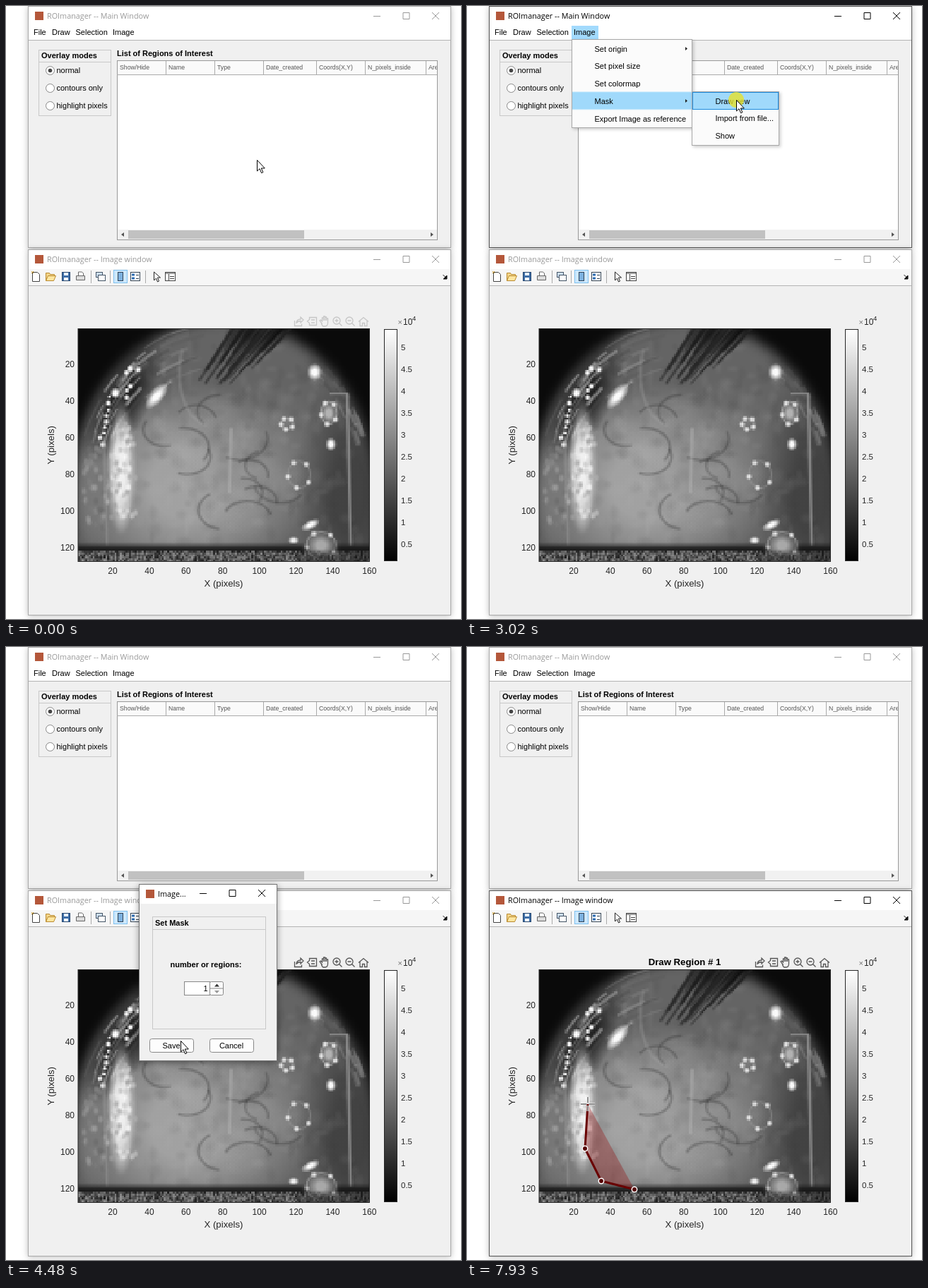
Animation of 644 by 869 pixels, one loop 8 s. Source, as an HTML page with a canvas:

```html
<!DOCTYPE html>
<html lang="en">
<head>
<meta charset="utf-8">
<title>ROImanager</title>
<style>
  html, body { margin: 0; width: 100%; height: 100%; overflow: hidden; background: #fff; }
  svg { position: absolute; left: 0; top: 0; font: 11px "Liberation Sans", Arial, sans-serif; }
  canvas { position: absolute; left: 102px; top: 457px; width: 413px; height: 331px; image-rendering: pixelated; }
  .title { font: 10.8px "Open Sans", "Noto Sans", sans-serif; }
  .b { font-weight: bold; }
  .mid { text-anchor: middle; }
  .end { text-anchor: end; }
  .line { fill: none; stroke: currentColor; }
  .hidden { opacity: 0; }
</style>
</head>
<body>
<svg id="back" width="644" height="869"></svg>
<canvas id="photo" width="160" height="128"></canvas>
<svg id="front" width="644" height="869"></svg>
<script>
const LOOP = 8000;
const $ = id => document.getElementById(id);

// ---- markup helpers ----
const text = (x, y, s, size = 11, cls = '', fill = '#000') =>
  `<text x="${x}" y="${y}" class="${cls}" fill="${fill}" style="font-size:${size}px">${s}</text>`;
const rect = (x, y, w, h, fill, stroke = 'none', extra = '') =>
  `<rect x="${x}" y="${y}" width="${w}" height="${h}" fill="${fill}" stroke="${stroke}" ${extra}/>`;
const path = (d, stroke = '#555', fill = 'none', extra = '') =>
  `<path d="${d}" stroke="${stroke}" fill="${fill}" ${extra}/>`;
const range = (n, f) => Array.from({ length: n }, (_, i) => f(i)).join('');
const caption = (x, y, s) => `<text x="${x}" y="${y}" class="title" fill="currentColor">${s}</text>`;
const controls = (x, y, gap) =>
  `<path class="line" d="M${x - 5} ${y + .5}h10m${gap - 9.5}-5h9v9h-9zm${gap - .5}-.5l10 10m0-10l-10 10"/>`;
const logo = (x, y) => rect(x, y, 12, 12, '#b4573a');

function frame(id, y, h, name) {
  return rect(31.5, y + .5, 598, h, '#f0f0f0', '#aaa', `id="${id}Box" style="filter:drop-shadow(0 1px 4px #0004)"`) +
    rect(32, y + 1, 597, 27, '#fff') + logo(41, y + 8) +
    `<g id="${id}Bar" color="#999">${caption(58, y + 18, name)}${controls(525, y + 14, 41.5)}</g>`;
}

// ---- main window ----
function mainWindow() {
  const radios = ['normal', 'contours only', 'highlight pixels'];
  const cols = { 'Show/Hide': 69, Name: 69, Type: 69, Date_created: 75, 'Coords(X,Y)': 69, N_pixels_inside: 86, Area: 69 };
  let x = 157.5;
  const head = Object.entries(cols).map(([name, w]) => {
    const cell = text(x + 3.5, 90, name, 8.7, '', '#555') + path(`M${x} 78v19`, '#aaa');
    x += w;
    return cell;
  }).join('');
  return frame('main', 0, 342, 'ROImanager -- Main Window') +
    rect(32, 27, 597, 21, '#fff') + path('M32 48.5h597', '#b4b4b4') +
    rect(148, 28, 38, 20, '#a2dafd', 'none', 'id="menuHead" class="hidden"') +
    text(39, 41, 'File') + text(65, 41, 'Draw') + text(98.5, 41, 'Selection') + text(151, 41, 'Image') +
    rect(46.5, 62.5, 102, 93, '#f0f0f0', '#c8c8c8') + path('M46 79.5h103', '#c8c8c8') +
    text(50, 74, 'Overlay modes', 11, 'b') +
    radios.map((s, i) => `<circle cx="62.5" cy="${91.5 + i * 25}" r="6" fill="#fff" stroke="#888"/>` +
      text(71.5, 95 + i * 25, s)).join('') + '<circle cx="62.5" cy="91.5" r="2.8" fill="#444"/>' +
    text(157, 71, 'List of Regions of Interest', 11, 'b') +
    rect(157.5, 77.5, 453, 254, '#fff', '#999') + rect(158, 78, 452, 19, '#fafafa') + path('M157 97.5h453', '#aaa') +
    `<svg x="158" y="78" width="452" height="20" viewBox="158 78 452 20">${head}</svg>` +
    rect(158, 317, 452, 14, '#f1f1f1') + rect(173, 318, 249, 12, '#c1c1c1') +
    path('M167 321v6l-4-3zM601 321v6l4-3z', 'none', '#555');
}

// ---- image window ----
function toolIcons() {
  return path('M37.5 377.5h7l3 3v10h-10z', '#444', '#fff') + path('M36 376l3 3m0-3l-3 3', '#d09a20') +
    path('M56.5 389.5v-11h5l1 2h6v3', '#b98a30', '#f3d58a') + path('M56.5 389.5l3-7h11l-3 7z', '#b98a30', '#ffe6a0') +
    rect(79.5, 377.5, 11, 12, '#3f6fa8', '#24456e') + rect(82, 378, 6, 4, '#e8f0f8') + rect(82, 385, 6, 4, '#fff') +
    path('M102.5 382v-5h5l2 2v3', '#666', '#fff') + path('M99.5 382.5h12v6h-12z', '#666', '#ddd') +
    path('M120.5 375v18m27-18v18m50-18v18', '#aaa') +
    rect(127.5, 377.5, 9, 7, '#cfe0f2', '#456') + rect(130.5, 381.5, 10, 8, '#fff', '#456') +
    rect(152.5, 374.5, 19, 18, '#cce8ff', '#7fc1ee') + rect(158.5, 377.5, 7, 12, '#7db2e0', '#345') +
    rect(176.5, 377.5, 13, 12, '#fff', '#345') + path('M178 381h4m-4 5h4', '#2c6bb0', 'none', 'stroke-width="3"') + path('M184 381.5h4m-4 5h4', '#345') +
    path('M209.5 377v12l3-3 2 5 2-1-2-5h4z', '#222', '#fff') +
    rect(225.5, 377.5, 14, 12, '#fff', '#444') + path('M226 379h13M230.5 380v9M232 383.5h6m-6 3h6', '#444') +
    path('M618.5 381l4 4M624 382v5h-5z', '#111', '#111');
}

function imageWindow() {
  const ink = '#262626';
  return frame('img', 345, 518, 'ROImanager -- Image window') +
    rect(32, 373, 597, 23, '#f6f6f6') + path('M32 396.5h597', '#b4b4b4') + toolIcons() +
    range(8, i => text(151 + i * 51.9, 805, 20 * (i + 1), 12, 'mid', ink)) +
    range(6, i => text(97, 512.3 + i * 51.85, 20 * (i + 1), 12, 'end', ink)) +
    text(308, 823, 'X (pixels)', 13.2, 'mid', ink) +
    `<g transform="translate(68 622.5) rotate(-90)">${text(0, 0, 'Y (pixels)', 13.2, 'mid', ink)}</g>` +
    `<linearGradient id="gray" x2="0" y2="1"><stop stop-color="#fff"/><stop offset="1" stop-color="#000"/></linearGradient>` +
    rect(535.5, 458.5, 18, 328, 'url(#gray)', ink) +
    range(10, i => text(559, 766.5 - i * 30.95, (i + 1) / 2, 11.5, '', ink)) +
    text(554.5, 452, '×', 11, '', '#777') + text(562, 452, '10', 12, '', ink) + text(575, 446, '4', 9.5, '', ink);
}

// ---- overlays ----
const axesTools = () => `<g id="axesTools" stroke-width="1.3">` +
  path('M408.5 446v7.5h10v-3M411 450q0-6 6-6v-3l4 4-4 4v-2.500q-4 0-6 3z') +
  path('M429.5 441.500h10v11h-10v-3l-3-2.500 3-2.500zM432 445h5m-5 4h5') +
  path('M447 450l-3-4 1.500-1 2 2v-5h2v4-6h2v6-5h2v5-3h2v6q0 5-4 5h-2q-2 0-3-4z') +
  [468, 486].map(x => `<circle cx="${x}" cy="446" r="5" fill="none" stroke="#555"/>` +
    path(`M${x + 3.5} 449.500l4 4M${x - 2.5} 446h5`)).join('') + path('M468 443.500v5') +
  path('M499 447.500l7-6 7 6M501 446v7.500h3.500v-4h3v4h3.500v-7.500') + '</g>';

function dialog() {
  const button = (x, s, id) => rect(x + .5, 555.5, 62, 19, '#fdfdfd', '#888', `rx="3" id="${id}"`) + text(x + 31, 568.5, s, 11, 'mid');
  return `<g id="dialog" class="hidden" style="transform-origin:286px 461px">` +
    rect(188.5, 336.5, 195, 250, '#f0f0f0', '#777', 'style="filter:drop-shadow(0 2px 5px #0006)"') +
    rect(189, 337, 194, 27, '#fff') + logo(198, 344) + controls(279, 349, 41.5) +
    `<g id="dialogBody">` + caption(215, 354, 'Image...') +
    rect(207.5, 382.5, 160, 159, '#f0f0f0', '#c8c8c8') + path('M207 400.5h161', '#c8c8c8') +
    text(211, 395, 'Set Mask', 11, 'b') + text(283, 453.5, 'number or regions:', 11, 'b mid') +
    rect(252.5, 474.5, 36, 19, '#fff', '#888') + text(285.5, 488, '1', 11, 'end') +
    rect(288.5, 474.5, 19, 19, '#fafafa', '#888', 'rx="2"') + path('M289 484h19', '#888') +
    path('M295 481.500h7l-3.500-4z', 'none', '#333') + path('M295 487h7l-3.500 4z', 'none', '#999') +
    button(203, 'Save', 'save') + button(288, 'Cancel', 'cancel') + '</g></g>';
}

const ROW = 24.75, BLUE = '#a0d9fb', EDGE = '#1b8ade';

function menus() {
  const box = (x, y, w, h) => rect(x, y, w, h, '#fbfbfb', '#a8a8a8', 'style="filter:drop-shadow(2px 2px 2px #0003)"');
  const list = (x, y, names) => names.map((s, i) => text(x, y + i * ROW, s)).join('');
  return `<g id="menu" class="hidden">` + box(148.5, 47.5, 170, 125) +
    rect(149.5, 48, 168, 24, BLUE, EDGE, 'id="hover" class="hidden"') +
    list(180.5, 64.5, ['Set origin', 'Set pixel size', 'Set colormap', 'Mask', 'Export Image as reference']) +
    path('M309 58v5l3-2.500zm0 74v5l3-2.500z', 'none', '#222') + '</g>' +
    `<g id="submenu" class="hidden">` + box(318.5, 121.5, 123, 76) +
    rect(319.5, 122.5, 121, 24, BLUE, EDGE, 'id="subHover" class="hidden"') +
    list(351.5, 138.5, ['Draw new', 'Import from file...', 'Show']) + '</g>';
}

// Pointer legs: start, end, then where it arrives; it rests in between.
const legs = [
  [0, 70, 355, 218], [70, 840, 162, 35], [1200, 1530, 186, 90], [1530, 1940, 300, 130], [2070, 2420, 381, 133],
  [3090, 3650, 237, 724], [3650, 3930, 239, 746], [3930, 4480, 247, 558], [4690, 5040, 240, 550],
  [5640, 5800, 240, 648], [5800, 6420, 237, 769], [6550, 7020, 190, 757], [7170, 7500, 167, 711], [7570, 7930, 171, 648]
];
const corners = legs.slice(-4, -1).map(([, , x, y], i) => ({ x, y, t: legs[legs.length - 3 + i][0] }));

$('back').innerHTML = mainWindow() + imageWindow();
$('front').innerHTML = rect(102, 457.5, 412.5, 330, 'none', '#262626') +
  path('', '#690000', 'rgba(150,0,0,.3)', 'id="region" class="hidden" stroke-width="3" stroke-linejoin="round"') +
  corners.map(({ x, y }, i) => `<circle id="corner${i}" class="hidden" cx="${x}" cy="${y}" r="3.7" fill="#500" stroke="#fff" stroke-width="1.5"/>`).join('') +
  `<g id="regionTitle" class="hidden">${text(308, 451, 'Draw Region # 1', 13.2, 'b mid')}</g>` +
  axesTools() + dialog() + menus() +
  `<g id="pointer"><circle id="click" class="hidden" r="11" fill="#e6e22c"/>` +
  path('M.5.5v15.500l3.500-3.300 2.600 6 2.300-1-2.600-5.700h5z', '#000', '#fff', 'id="arrow"') +
  `<g id="cross" class="hidden">${['#fff', '#222'].map((c, i) =>
    path('M-10 0h8M2 0h8M0-10v8M0 2v8', c, 'none', `stroke-width="${3 - 2 * i}"`)).join('')}</g></g>`;

// ---- photo, in soft gray shapes ----
function paintPhoto() {
  const g = $('photo').getContext('2d'), px = 413 / 160;
  let seed = 11;
  const rnd = (a = 0, b = 1) => a + (b - a) * (seed = seed * 16807 % 2147483647) / 2147483647;
  const times = (n, f) => { for (let i = 0; i < n; i++) f(i / n); };
  const tone = (v, a = 1) => `rgba(${v},${v},${v},${a})`;
  const blur = r => { g.filter = r ? `blur(${r}px)` : 'none'; };
  const oval = (x, y, rx, ry, v, a = 1, rot = 0) => {
    g.save(); g.translate(x, y); g.rotate(rot); g.scale(rx, ry);
    const fade = g.createRadialGradient(0, 0, .3, 0, 0, 1);
    fade.addColorStop(0, tone(v, a)); fade.addColorStop(1, tone(v, 0));
    g.fillStyle = fade; g.beginPath(); g.arc(0, 0, 1, 0, 7); g.fill(); g.restore();
  };
  const arc = (x, y, rx, ry, from, to, v, a, w, rot = 0) => {
    g.strokeStyle = tone(v, a); g.lineWidth = w; g.beginPath(); g.ellipse(x, y, rx, ry, rot, from, to); g.stroke();
  };
  const line = (x0, y0, x1, y1, v, a, w) => {
    g.strokeStyle = tone(v, a); g.lineWidth = w; g.beginPath(); g.moveTo(x0, y0); g.lineTo(x1, y1); g.stroke();
  };
  const rim = (s, from, to, v, a, w) => arc(308, 690, 215 * s, 245 * s, from, to, v, a, w);
  g.scale(1 / px, 1 / px); g.translate(-102, -457);

  // tissue, lit from the lower left
  g.fillStyle = tone(100); g.fillRect(102, 457, 413, 331);
  oval(255, 680, 170, 150, 172, .85);
  oval(360, 650, 110, 120, 135, .5);
  oval(485, 690, 75, 190, 55, .75);
  times(260, () => oval(rnd(180, 500), rnd(480, 760), rnd(5, 16), rnd(5, 16), rnd() < .5 ? 40 : 190, .07));
  blur(.7);
  times(13, u => {
    const x = rnd(220, 410), y = 575 + u * 165, r = rnd(24, 40), from = rnd(0, 6);
    oval(x, y, r, r * .8, 175, .16);
    arc(x, y, r, r * .75, from, from + 2.4, 50, .3, 3.5);
  });
  line(319, 598, 316, 690, 185, .4, 5);
  arc(290, 520, 45, 75, 1.7, 3.6, 170, .25, 5);

  // dark surround, left side and streaks along the rim
  oval(165, 560, 38, 100, 28, .9, .5);
  oval(125, 690, 38, 80, 120, .8);
  blur(3);
  g.fillStyle = tone(10); g.beginPath(); g.rect(60, 420, 500, 420);
  g.moveTo(93, 840); g.lineTo(93, 690); g.ellipse(308, 690, 215, 245, 0, Math.PI, 2 * Math.PI); g.lineTo(523, 840);
  g.fill('evenodd');
  blur(.6);
  times(60, () => {
    const from = rnd(3.45, 4.4);
    rim(rnd(.72, .99), from, from + rnd(.06, .25), rnd(70, 220), .45, rnd(2, 5));
  });
  times(24, () => {
    const from = rnd(5.35, 5.9);
    rim(rnd(.9, .99), from, from + rnd(.04, .15), rnd(70, 160), .4, rnd(3, 6));
  });

  // hair
  oval(360, 460, 55, 32, 22, .9, -.3);
  times(45, () => {
    const u = rnd(), len = rnd(25, 80), x = 318 + 90 * u;
    line(x, 452, x - len * (.65 + .4 * u), 457 + len, rnd(12, 60), .55, rnd(2, 4));
  });

  // reflections
  blur(.9);
  oval(163, 650, 19, 100, 235, .9);
  oval(163, 660, 20, 90, 250, .6);
  blur(.3);
  times(90, () => oval(163 + rnd(-11, 11) + rnd(-11, 11), rnd(592, 725), 5, 6, rnd(150, 255), .6));
  times(45, () => oval(rnd(108, 148), rnd(620, 740), 5, 7, rnd(90, 200), .4));
  times(16, u => {
    const a = 3.48 + u * .6, s = rnd(.84, .95), r = rnd(3, 6);
    oval(308 + 215 * s * Math.cos(a), 690 + 245 * s * Math.sin(a), r, r, 250);
  });
  oval(213, 553, 24, 10, 250, 1, -.85);
  oval(155, 548, 7, 8, 255);
  oval(437, 519, 11, 13, 250);
  oval(460, 621, 8, 10, 250);
  oval(431, 735, 15, 7, 250, 1, -.5);
  oval(407, 757, 8, 6, 240);
  const bead = (x, y, rx, ry, v, fill) => {
    oval(x, y, rx, ry, v, fill);
    arc(x, y, rx, ry, 0, 7, v, .6, 2.5);
    times(5, u => oval(x + rx * Math.cos(u * 6 + .6), y + ry * Math.sin(u * 6 + .6), 5, 5, 250, .8));
  };
  bead(398, 592, 9, 8, 160, .2);
  bead(415, 664, 16, 19, 150, .1);
  bead(457, 577, 11, 16, 200, .8);
  bead(446, 764, 21, 19, 190, .8);
  line(483, 548, 488, 765, 160, .7, 4);
  line(458, 549, 483, 549, 170, .6, 3);
  line(138, 610, 143, 765, 160, .35, 4);

  // dark edge and dotted strip below
  blur(1);
  g.fillStyle = tone(20, .9); g.fillRect(95, 764, 329, 30); g.fillRect(468, 764, 60, 30); g.fillRect(424, 776, 44, 20);
  blur(0);
  for (let x = 102; x < 515; x += px)
    for (let y = 773; y < 786; y += px) {
      g.fillStyle = tone(rnd(30, 220), x < 410 ? .8 : .4);
      g.fillRect(x, y, px, px);
    }
}
paintPhoto();

// ---- motion ----
function track(id, prop, steps, easing = 'step-end') {
  const keys = steps.map(([t, v, e]) => ({ offset: t / LOOP, [prop]: v, easing: e || easing }));
  keys.push({ offset: 1, [prop]: steps[steps.length - 1][1] });
  $(id).animate(keys, { duration: LOOP, iterations: Infinity }).startTime = 0;
}
const toggle = (id, prop, off, on, ...spans) =>
  track(id, prop, [[0, off], ...spans.flatMap(([from, to]) => to ? [[from, on], [to, off]] : [[from, on]])]);
const during = (id, ...spans) => toggle(id, 'opacity', 0, 1, ...spans);
const active = (id, ...spans) => {
  toggle(id + 'Bar', 'color', '#999', '#000', ...spans);
  toggle(id + 'Box', 'stroke', '#aaa', '#555', ...spans);
};

const moves = legs.flatMap(([from, to, x, y], i) => {
  const [, , px, py] = legs[Math.max(0, i - 1)];
  const far = Math.hypot(x - px, y - py) > 150;
  return [[from, i ? px : x, i ? py : y, far ? 'ease-in-out' : 'linear'], [to, x, y, 'linear']];
});
track('pointer', 'transform', moves.map(([t, x, y, e]) => [t, `translate(${x}px,${y}px)`, e]));
toggle('click', 'opacity', 0, .8, ...[840, 3020, 5040].map(t => [t, t + 70]));
toggle('arrow', 'opacity', 1, 0, [6140]);
during('cross', [6140]);

active('main', [840, 3300], [5660, 6000]);
active('img', [6000]);
track('axesTools', 'opacity', [[0, .27], [200, 0], [3440, 0], [3600, 1], [5640, 1], [5660, 0], [6070, 0], [6210, 1]], 'linear');
during('regionTitle', [6000]);

during('menuHead', [1170, 3090]);
during('menu', [1170, 3090]);
during('hover', [1272, 3090]);
track('hover', 'transform', [0, 1, 2, 3].map(i => [i && 1272 + i * 195, `translateY(${i * ROW}px)`]));
during('submenu', [1870, 3090]);
toggle('hover', 'stroke', EDGE, BLUE, [2148]);
during('subHover', [2148, 3090]);

const pop = (prop, small, full) =>
  track('dialog', prop, [[0, small], [3620, small], [3790, full], [5660, full], [5860, small]], 'linear');
pop('opacity', 0, 1);
pop('transform', 'scale(.95)', 'scale(1)');
during('dialogBody', [3860, 5900]);
toggle('save', 'fill', '#fdfdfd', '#dcdcdc', [5040, 5110]);

// The open corner of the region follows the pointer.
corners.forEach(({ t }, i) => during('corner' + i, [t]));
const outline = ([t, x, y]) => {
  const pts = corners.filter(c => c.t <= t);
  while (pts.length < 4) pts.push({ x, y });
  return [t, `path("M${pts.map(p => p.x + ' ' + p.y).join('L')}")`];
};
const drawn = moves.filter(([t]) => t >= corners[0].t).map(outline);
track('region', 'd', [[0, drawn[0][1]], ...drawn], 'linear');
during('region', [corners[0].t]);
</script>
</body>
</html>
```
